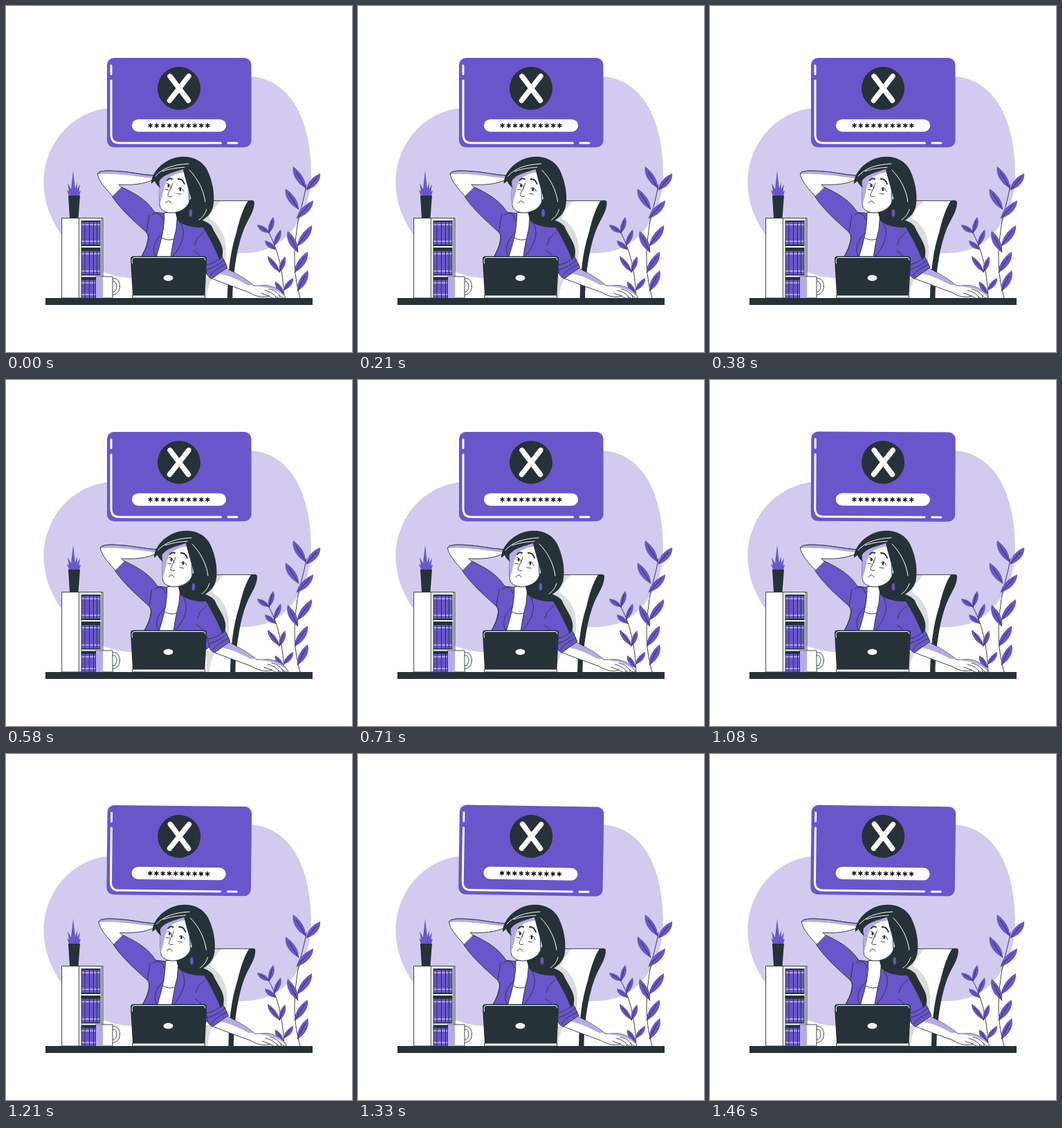
These frames come from a looping animation (500 by 500 pixels, 1.5 s). An HTML page:

```html
<!DOCTYPE html>
<html lang="en">
<head>
<meta charset="utf-8">
<title>Wrong password</title>
<style>
html, body { margin: 0; width: 100%; height: 100%; overflow: hidden; background: #fff; }
svg { display: block; width: 100vw; height: 100vh; }
path, rect, ellipse, circle { stroke-linecap: round; stroke-linejoin: round; }
.ink { fill: #263238; }
.main { fill: #6956ca; }
.soft { fill: #b4aae5; }
.white { fill: #fff; }
.shade { fill: #dcdcdc; }
.edge { stroke: #263238; stroke-width: .9; }
.line { fill: none; stroke: #263238; stroke-width: .9; }
.shine { fill: none; stroke: #fff; stroke-width: 1; }
.bold { fill: none; stroke: #fff; stroke-width: 3; }
</style>
</head>
<body>
<svg viewBox="0 0 500 500">
  <path fill="#d2cbef" d="M147 147.500C89 155 54.500 205 54.500 255C54.500 288 68 314 84 336C108 370 140 391 180 393C240 393 280 358 342 357C385 357 408 336 425 307C438 284 441 262 441 240C441 180 420 108 355 102L300 103Z"/>

  <g id="plants"></g>

  <g id="worker">
    <!-- chair -->
    <path class="white" d="M292 281H353L332 330L322 422H290V300Z"/>
    <path class="shade" d="M310 281C304 291 295 296 294 307C314 318 324 345 315 378L309 366L286 315L291 281ZM286 391L298 394Q291 405 290 422H286Z"/>
    <path class="line" d="M298 281.400H353"/>
    <path class="ink" d="M350 281.500C353 280.500 358 280 359 283C359.500 296 351 306 345 320C335 343 328 384 327.500 422H320C321 385 324 355 333 328C338 306 344 290 350 281.500Z"/>

    <!-- raised arm -->
    <path class="white edge" d="M214 245C195 244 178 239 158 238.500C145 237.500 133 238 132.500 243C134 253 145 265 155 276L168 263L163 258C180 259 199 258 213 251Z"/>
    <path class="soft" d="M214 245C195 244 178 239 158 238.500C145 237.500 133 238 132.500 243C155 241 180 245 212 249Z"/>
    <path class="line" d="M214 245C195 244 178 239 158 238.500C145 237.500 133 238 132.500 243"/>

    <!-- resting arm -->
    <path class="white edge" d="M318 379C334 387 348 395 358 404C367 405 375 402 382 405C391 407 400 413 404 421C401 424 399 421 395 418C398 423 395 424 390 420C390 424 386 423 380 419C372 422 361 420 352 414C332 407 314 400 298 394Z"/>
    <path class="soft" d="M316 379C334 387 348 395 356 403L349 403C335 395 321 389 309 387ZM358 404C367 405 375 402 382 405C391 407 400 413 404 421C395 413 386 408 377 407Z"/>
    <path class="line" d="M374 411C380 412 386 415 390 420M380 409C387 410 392 414 395 418M369 415L380 419"/>

    <!-- jacket and shirt -->
    <path class="main edge" d="M168 262C189 272 204 281 215 298L232 300L252 307L284 318C296 335 307 352 315 367L320 378L297 394C293 392 291 390 290 386L284 390V400H200L196 362C204 348 209 336 203 327C183 309 167 295 154 276Z"/>
    <path class="white edge" d="M229 299C229 324 224 340 217 364H238C240 350 242 338 246 323L248 299Z"/>
    <path class="line" d="M225.500 335Q234 340 242 337M227 309C224 299 217 297 211 302M249 309C260 322 260 339 241 362M217 362C209 350 217 337 227 327"/>
    <path class="line" d="M203 327L207 302M206 331C205 344 201 353 196 362M290 386C288 372 283 360 272 354M273 345L276 336L286 326M289 374C299 373 307 367 313 361M290 381C300 378 308 374 315 367M295 390C301 381 309 378 318 373"/>

    <!-- head -->
    <path class="ink" d="M245 299L268 278L275 308C284 309 293 312 298 319C303 332 316 345 313 360L309 367C302 350 293 333 285 320C272 321 255 317 248 310Z"/>
    <path class="white edge" d="M223 248C221 263 221 283 223 291C228 299 239 300 246 298C255 296 262 291 265 283L263 233Z"/>
    <path class="soft" d="M222 247L260 235V240C249 241 239 245 234 250C227 260 228 272 222 288C221 272 221 260 222 247Z"/>
    <path class="ink" d="M210 257C210 241 226 223 248 218.500C267 215.500 283 222 291 237C298 252 302 269 300 286C299 298 290 309 274 314C270 305 270 296 269 284C266 270 260 254 256 236C242 239 228 244 222 252C221 257 222 260 223 263C219 260 216 256 215 253Z"/>
    <path class="shine" d="M216 246C226 234 243 229 264 228M226 239C239 234 250 234 258 233M265 237C278 250 286 267 288 283M290 294C287 303 283 306 279 309"/>
    <ellipse class="main edge" cx="267" cy="299" rx="2.900" ry="6"/>
    <path class="line" style="stroke-width:2" d="M233 252Q236 248 240 250M249 250Q255 249 258 257"/>
    <path class="line" d="M241 256C239 264 234 270 234 274Q236 277 240 275M231 285Q235 278 239 285M232 256Q237 256 239 264M249 264Q253 259 257 268M230 265L235 266M247 271L253 272"/>
    <ellipse class="ink" cx="235" cy="259.500" rx="1.500" ry="2.500"/>
    <ellipse class="ink" cx="252" cy="265" rx="1.500" ry="2.500"/>
  </g>

  <rect class="ink" x="57" y="422" width="386" height="10"/>

  <!-- bookcase -->
  <rect class="white edge" x="81" y="306.500" width="59" height="115.500"/>
  <rect class="ink" x="108.500" y="310" width="28" height="112"/>
  <path class="line" d="M105.500 307V422M138 307V422"/>
  <g id="books"></g>
  <path class="bold" style="stroke-width:2" d="M110 348H136M110 390.500H136"/>
  <path class="ink" d="M90 274H107L104.500 306.500H92Z"/>
  <path class="main" d="M91 274L88 266L91 268L89 256L94 265L97 238L100 264L103 255L103 265L107 257L105.500 268L108 267L106 274Z"/>

  <!-- mug -->
  <path class="line" d="M154 394C168 390 168 419 154 417M154 398C162 396 162 414 154 413"/>
  <rect class="white edge" x="130" y="391" width="24" height="31"/>
  <rect class="soft" x="130" y="391.500" width="10" height="30.500"/>

  <!-- laptop -->
  <path class="ink" d="M184 361.500H286Q290.500 361.500 290 367L287.500 418H183L180 367Q179.500 361.500 184 361.500Z"/>
  <path class="shine" d="M182.500 372L182 367Q182 363.500 186 363.500H285Q288 363.500 288 367"/>
  <rect class="white edge" x="183" y="418" width="104.500" height="4"/>
  <ellipse class="white" cx="234.500" cy="393" rx="7" ry="4.200"/>

  <g id="card">
    <rect class="main" x="146" y="75" width="208.500" height="129.300" rx="10"/>
    <path class="bold" d="M152 86V98.500M152 108V186Q152 198 164 198H310.500M321 198H334"/>
    <circle class="ink" cx="250" cy="119" r="31"/>
    <path class="bold" style="stroke-width:7.500" d="M237 101.500L263.500 136.500M264 101.500L236.500 136.500"/>
    <rect class="white" x="182" y="163.700" width="136" height="18" rx="9"/>
    <path id="stars" fill="none" stroke="#000" stroke-width="1.300"/>
  </g>
</svg>
<script>
const $ = id => document.getElementById(id);

// A leaf from tip to base, fuller on its lower side near the tip.
function leaf([tx, ty, bx, by], width) {
  const dx = tx - bx, dy = ty - by, len = Math.hypot(dx, dy), down = Math.sign(dx);
  const at = (along, out) =>
    `${bx + dx * along - dy / len * out * down} ${by + dy * along + dx / len * out * down}`;
  return `<path class="main" d="M${at(0, 0)}C${at(.3, width)} ${at(.75, width * 1.2)} ${at(1, 0)}
    C${at(.7, -width * .7)} ${at(.3, -width)} ${at(0, 0)}"/>
    <path class="line" d="M${at(0, 0)}L${at(.75, 0)}"/>`;
}

const tall = [
  [415, 232, 433, 263], [454, 242, 434, 266], [404, 264, 423, 294], [444, 281, 420, 307],
  [407, 325, 422, 356], [442, 317, 421, 347], [436, 355, 417, 385], [436, 382, 421, 412]
];
const small = [
  [386, 305, 380, 328], [363, 316, 381, 328], [397, 323, 387, 347], [374, 339, 390, 352],
  [403, 362, 395, 385], [378, 361, 395, 384], [415, 393, 401, 411], [389, 398, 401, 416]
];
$('plants').innerHTML =
  '<path class="line" d="M425 422C416 390 415 360 420 325C422 303 431 280 434 258M402 422C401 390 394 350 378 325"/>' +
  tall.map(l => leaf(l, 7)).join('') + small.map(l => leaf(l, 5)).join('');

const bookX = [109.5, 114.5, 121, 127, 132];
$('books').innerHTML = [[312, 33], [354, 34], [396, 26]].map(([y, h]) =>
  bookX.map((x, i) => {
    const w = (bookX[i + 1] || 136.5) - x - 1;
    return `<rect class="main" x="${x}" y="${y}" width="${w}" height="${h}"/>
      <path class="shine" d="M${x + .5} ${y + 4}h${w - 1}m0 ${h - 9}h${1 - w}"/>`;
  }).join('')).join('');

$('stars').setAttribute('d', Array.from({ length: 10 }, (_, i) =>
  `M${208.6 + i * 9.2} 169.800v6m-2.600 -4.500l5.200 3m0 -3l-5.200 3`).join(''));

// Sideways shake: ten equal linear segments.
const shake = [0, -1, 2, -4, 4, -4, 4, -4, 2, -1, 0];
const LOOP = 1500, LEAD = 20;

function draw(now) {
  const t = Math.min(now % LOOP + LEAD, LOOP);
  const pos = t / LOOP * 10, i = Math.min(Math.floor(pos), 9);
  const x = shake[i] + (shake[i + 1] - shake[i]) * (pos - i);
  // The card sways to one degree and starts back before the loop cuts.
  const sway = Math.max(0, t - 1000);
  const angle = sway < 375 ? sway / 375 : 1 - (sway - 375) / 375;
  $('worker').setAttribute('transform', `translate(${x} 0)`);
  $('card').setAttribute('transform', `rotate(${angle} 250.200 139.600)`);
}

const start = performance.now();
function tick() {
  draw(performance.now() - start);
  requestAnimationFrame(tick);
}
tick();
</script>
</body>
</html>
```
